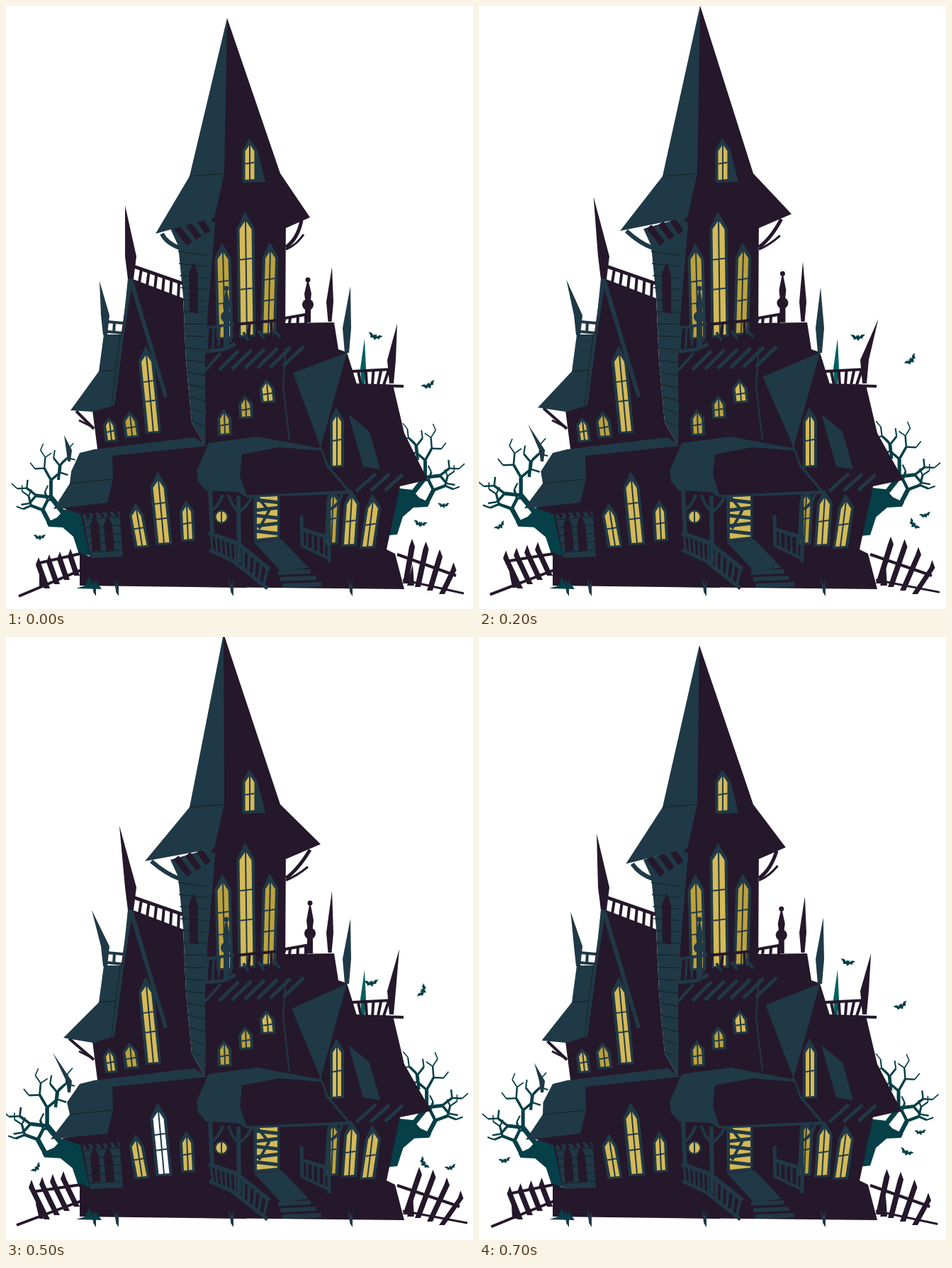
An HTML page with a canvas for the animation above (0.8 s loop, 659 by 850 pixels).

```html
<!DOCTYPE html>
<html lang="en">
<head>
<meta charset="utf-8">
<title>Haunted house</title>
<style>
html, body { margin: 0; height: 100%; overflow: hidden; background: #fff; }
canvas { display: block; }
</style>
</head>
<body>
<canvas id="stage" width="659" height="850"></canvas>
<script>
const g = document.getElementById('stage').getContext('2d');
const DARK = '#25182b', TEAL = '#203946', TREE = '#063f47', SEAM = '#17282b';
const GOLD = '#d4b957', OCHRE = '#bda13c';

// How far the house is stretched in each 100 ms step.
const STRETCH = [0, .5, .8, 1, .5, 1, .8, .25];
let s, whip, lift, wave;
function setPose(t) {
  s = STRETCH[Math.floor(t / 100) % STRETCH.length];
  whip = Math.sin(Math.PI * s ** 3);
  lift = Math.sin(Math.PI * s ** 1.3);
  wave = Math.sin(5 * s * s);
}
const tip = (x, y, dx, dy, bend = 0) => [x + dx * s + bend * whip, y + dy * s];

let seed;
function random() {
  seed = (seed * 16807) % 2147483647;
  return seed / 2147483647;
}

function trace(pts) {
  g.beginPath();
  for (let i = 0; i < pts.length; i += 2) g.lineTo(pts[i], pts[i + 1]);
}
function poly(col, ...pts) {
  trace(pts);
  g.fillStyle = col;
  g.fill();
}
function line(col, w, ...pts) {
  trace(pts);
  g.strokeStyle = col;
  g.lineWidth = w;
  g.stroke();
}
function curve(col, w, x, y, cx, cy, x2, y2) {
  g.beginPath();
  g.moveTo(x, y);
  g.quadraticCurveTo(cx, cy, x2, y2);
  g.strokeStyle = col;
  g.lineWidth = w;
  g.stroke();
}
function dot(col, x, y, r) {
  g.beginPath();
  g.arc(x, y, r, 0, 7);
  g.fillStyle = col;
  g.fill();
}
// n bars spread evenly between two end positions.
function bars(n, col, w, a, b) {
  for (let i = 0; i < n; i++)
    line(col, w, ...a.map((v, j) => v + (b[j] - v) * i / (n - 1)));
}
// Pointed window with its peak at x, y; lean shifts the sill sideways.
function win(x, y, w, h, lean, cross = 1, glass = GOLD) {
  const r = w / 2, sy = y + w * .75, by = y + h, rise = Math.min(12, h / 6);
  poly(TEAL, x - 1, y - rise, x + r + 4, sy - 2, x + r + lean + 4, by + 3,
    x - r + lean - 4, by + 4, x - r - 4, sy - 1);
  poly(glass, x, y, x + r, sy, x + r + lean, by, x - r + lean, by + 1, x - r, sy);
  line(TEAL, 2, x, y, x + lean, by + 1);
  for (let i = 1; i <= cross; i++) {
    const k = i / (cross + 1) * .85, cx = x + lean * k, cy = sy + (by - sy) * k;
    line(TEAL, 2, cx - r, cy + 1, cx + r, cy - 1);
  }
}
// Spear finial: moving tip, fixed foot.
function spear(col, point, x, y, h, w = 8) {
  poly(col, ...point, x + w, y - h, x + w / 2, y, x - w / 2, y, x - w, y - h);
}
function finial(col, [x, y], ball, foot) {
  dot(col, x, y + 4, 3.5);
  poly(col, x, y + 2, x + 5, y + (ball - y) * .6, x + 3, ball, x - 3, ball, x - 5, y + (ball - y) * .6);
  dot(col, x, ball, 8);
  line(col, 8, x, ball, x, foot);
}

// Crooked bough: a tapering main stem with side shoots.
function bough(x, y, angle, len, w, depth) {
  if (!depth) return;
  const side = depth % 2 ? 1 : -1, a = angle + side * (.25 + random() * .2);
  const x2 = x + Math.cos(a) * len, y2 = y + Math.sin(a) * len;
  line(TREE, w, x, y, x2, y2);
  const thin = Math.max(1.5, w * .7);
  bough(x2, y2, angle + random() * .3 - .15, len * .8, thin, depth - 1);
  bough(x2, y2, angle + side * (.75 + random() * .3), len * .7, thin, depth - 2 > 0 ? depth - 2 : 0);
}
function tree(kx, ky) {
  seed = 41;
  g.translate(105, 740);
  g.scale(kx, ky);
  g.translate(-105, -740);
  poly(TREE, 125, 705, 82, 710, 72, 721, 57, 728, 60, 734, 80, 735, 95, 748, 103, 773, 125, 775);
  bough(62, 730, -2.3, 22, 6, 5);
  bough(82, 716, -1.8, 30, 7, 6);
  bough(74, 668, -1.05, 20, 4, 4);
}
function bat(x, y, turn, size) {
  g.save();
  g.translate(x, y);
  g.rotate(turn);
  g.scale(size, size);
  poly(TREE, -10, -4, -5, -4, -2, -1, -1, -4, 0, -2, 2, -4, 3, -1, 6, -4, 11, -4, 8, -1, 7, 2, 4, 1, 1, 5, -1, 2, -5, 3, -6, 0);
  g.restore();
}
function picket(x, y, bx, by, w) {
  poly(DARK, x, y, x + w, y + 11, bx + w, by, bx - w, by, x - w, y + 11);
}

function backdrop() {
  g.save();
  tree(1 + .13 * s, 1 + .07 * s);
  g.restore();
  g.save();
  g.transform(-1, 0, 0, 1, 655, -28);
  tree(1 + .05 * s, 1 + .03 * s);
  g.restore();
  spear(TEAL, tip(82, 605, -16, -19), 89, 642, 16, 4);

  bat(520 - 5 * s + 18 * whip, 466 - 23 * wave, .3 - .4 * s, 1);
  bat(596 - 8 * s + 20 * whip, 535 - 45 * s - 10 * wave, -.4 - .7 * s ** 3, 1);
  bat(617 + 10 * s + 6 * lift, 704 + 25 * s ** 3 - 20 * wave, -.3 * s, .8);
  bat(584 + 5 * s + 35 * lift, 730 - 12 * wave, .2 + .8 * s, .95);
  bat(47 - 4 * s - 20 * lift, 749 - 22 * lift, -.8 * s, .85);

  for (let i = 0; i < 4; i++) {
    picket(46 + 15 * i - 10 * s, 777 - 4 * i - 12 * s, 58 + 14 * i, 821 - 6 * i, 4);
    picket(573 + 19.5 * i + 10 * s, 751 + 3.7 * i * i - 4 * s, 564 + 17 * i, 814 + 5 * i, 4);
  }
  picket(50 - 5 * s, 788, 50, 820, 3);
  poly(DARK, 566, 817, 574, 787, 576, 817);
  line(DARK, 4, ...tip(43, 786, -5, -4), 105, 772);
  line(DARK, 4, ...tip(18, 832, -3, -3), 106, 795);
  line(DARK, 4, 552, 773, ...tip(635, 803, 5, 0));
  line(DARK, 3, 560, 809, ...tip(646, 828, 5, -2));
}

function rightWing() {
  spear('#00605f', [506, 469], 504, 533, 22, 4);
  line(DARK, 4, 488, 515, 546, 512);
  line(DARK, 4, 490, 534, 561, 536);
  bars(5, DARK, 4, [497, 515, 501, 534], [540, 513, 533, 534]);
  spear(DARK, tip(552, 448, 3, -8, 9), 544, 532, 33, 6);
  spear(DARK, tip(460, 368, 0, -10, -3), 457, 445, 28, 5);

  poly(DARK, 280, 470, 394, 447, 463, 446, 469, 484, 481, 488, 495, 533, 546, 534, 562, 602,
    ...tip(595, 668, 5, 0), 556, 677, 537, 766, 549, 772, 562, 822, 280, 819);
  spear(TEAL, tip(486, 395, 0, 2, -4), 481, 489, 35, 6);
  poly(TEAL, ...tip(405, 517, -2, 7, -3), 481, 489, 444, 622);
  poly(TEAL, 483, 575, 513, 600, 528, 653, 504, 649);
  bars(3, TEAL, 5, [494, 684, 522, 659], [535, 683, 560, 660]);
  line(TEAL, 3, 443, 621, 453, 647, 486, 686);
  win(467, 577, 12, 70, 0);
  win(462, 690, 11, 66, -3, 1, OCHRE);
  win(488, 692, 14, 66, -4);
  win(518, 698, 14, 63, -8);
}

function tower() {
  poly(DARK, 285, 290, 395, 290, 394, 470, 281, 490);
  curve(DARK, 5, 395, 340, 412, 328, ...tip(417, 302, 12, -2));
  curve(DARK, 3, 395, 343, 410, 337, ...tip(420, 322, 6, 2));

  const eave = tip(211, 321, -15, -5);
  curve(TEAL, 6, eave[0] + 9, eave[1], 226, 334, 245, 341);
  poly(TEAL, 232, 314, 296, 296, 284, 440, 281, 620, 262, 587, 254, 500, 250, 410, 243, 338);
  bars(3, DARK, 9, [240, 311, 259, 335], [273, 301, 285, 319]);
  for (let i = 0; i < 15; i++) {
    const y = 346 + i * 17, drop = Math.abs(i - 5.5);
    line(SEAM, 1.3, 243 + i * 1.15, y, 283 - i * .2, y + drop);
  }
  poly(DARK, 265, 361, 271, 378, 271, 434, 259, 431, 258, 377);

  const top = tip(312, 17, -5, -22, 4);
  poly(DARK, ...top, 387, 236, ...tip(429, 298, 15, -6), 395, 313, 290, 304, 300, 240);
  poly(TEAL, ...top, 308, 236, 294, 298, ...eave, 259, 240);
  line(SEAM, 1.3, 259, 240, 308, 236);
  poly(TEAL, 345, 189, 355, 204, 366, 248, 335, 249, 336, 205);
  win(344, 195, 13, 49, 0);
  win(306, 346, 15, 120, 3, 2, OCHRE);
  win(338, 302, 17, 161, 2, 2);
  win(373, 345, 14, 115, -3, 2, OCHRE);

  // Balcony
  poly(DARK, 281, 487, 318, 469, 395, 463, 395, 560, 281, 560);
  line(DARK, 4, 322, 449, 395, 442);
  bars(5, DARK, 4, [328, 450, 326, 470], [390, 443, 391, 464]);
  bars(3, TEAL, 4, [335, 460, 342, 471], [377, 456, 387, 467]);
  line(DARK, 4, 394, 440, 428, 434);
  bars(3, DARK, 4, [401, 439, 400, 448], [423, 435, 423, 447]);
  finial(DARK, tip(426, 382, 3, -11), 421 - 3 * s, 446);
  line(TEAL, 4, 281, 454, 322, 448);
  bars(5, TEAL, 3, [285, 454, 283, 486], [318, 449, 317, 474]);
  line(TEAL, 5, 281, 487, 308, 484, 324, 476);
  finial(TEAL, [311, 394], 438, 484);
  bars(6, TEAL, 5, [301, 513, 328, 486], [391, 508, 420, 480]);
  line(TEAL, 4, 281, 514, 303, 489);
  line(TEAL, 2, 395, 482, 391, 535, 400, 612);
  win(308, 573, 12, 29, 1, 1, OCHRE);
  win(338, 553, 12, 25, 1, 1, OCHRE);
  win(368, 530, 13, 26, 2);
}

function leftWing() {
  line(DARK, 5, 180, 367, 249, 391);
  bars(6, DARK, 4, [191, 371, 188, 390], [244, 391, 243, 412]);
  spear(DARK, tip(168, 281, -8, -15), 176, 385, 32, 8);
  spear(TEAL, tip(132, 388, -11, -3), 140, 464, 28, 6);
  bars(2, TEAL, 4, [143, 445, 165, 447], [143, 459, 165, 461]);
  line(TEAL, 4, 153, 445, 152, 461);
  poly(DARK, 174, 383, 250, 412, 254, 500, 262, 587, 281, 620, 130, 632, 122, 570, 150, 550);
  const eave = tip(91, 570, -10, -5);
  line(DARK, 4, eave[0] + 8, eave[1] + 1, 124, 596);
  line(DARK, 3, 103, 584, 123, 594);
  poly(TEAL, 138, 463, 164, 463, 172, 384, 179, 385, 167, 460, 153, 563, 123, 572, ...eave, 131, 515);
  line(SEAM, 1.3, 132, 515, 155, 513);
  line(SEAM, 1.3, 161, 463, 149, 563);
  poly(TEAL, 173, 386, 180, 388, 228, 550, 223, 552);
  win(198, 491, 14, 108, 10, 2);
  win(146, 584, 10, 27, 3);
  win(175, 576, 13, 29, 3, 1, OCHRE);
}

function groundFloor() {
  poly(DARK, 103, 706, 150, 632, 285, 616, 330, 660, 340, 820, 104, 817, 104, 770, 118, 776);
  poly(DARK, 78, 707, 142, 695, 163, 711, 104, 716);
  poly(TEAL, 104, 630, 124, 625, 266, 608, 284, 620, 150, 634, 151, 667, 143, 700,
    ...tip(67, 709, -4, -1), 90, 673, 92 - 6 * s, 656);
  line(SEAM, 1.3, 90, 673, 150, 667);
  poly(TEAL, 108, 716, 160, 712, 165, 776, 119, 778);
  bars(5, SEAM, 1.3, [110, 724, 161, 720], [118, 770, 164, 767]);
  bars(5, DARK, 4, [110, 711, 117, 721], [150, 708, 158, 719]);
  for (const x of [126, 145])
    poly(DARK, x - 2, 717, x + 5, 731, x + 8, 767, x - 4, 769, x - 7, 732);
  win(184, 709, 13, 51, 8);
  win(215, 668, 15, 88, 8, 2, s === 1 ? '#fff' : GOLD);
  win(255, 704, 12, 47, 2);
}

function porch() {
  // Door and steps
  poly(TEAL, 349, 689, 386, 689, 386, 752, 350, 755);
  poly(GOLD, 354, 692, 383, 691, 383, 748, 354, 751);
  for (let i = 0; i < 5; i++) {
    const y = 698 + i * 11, slant = i % 2 ? -4 : 4;
    line(TEAL, 5, 351, y - slant / 2, 386, y + slant / 2);
  }
  line(TEAL, 4, 355, 692, 371, 712, 357, 737);
  poly(TEAL, 350, 756, 389, 752, 427, 792, 388, 797);
  bars(3, TEAL, 6, [384, 799, 430, 797], [390, 817, 445, 815]);

  // Right railing
  line(TEAL, 5, 417, 718, 418, 762);
  line(TEAL, 5, 456, 690, 456, 784);
  line(TEAL, 5, 416, 737, 459, 750);
  line(TEAL, 4, 416, 760, 458, 780);
  bars(4, TEAL, 3, [425, 741, 425, 764], [449, 748, 449, 776]);
  curve(TEAL, 4, 456, 710, 470, 704, 474, 688);

  // Left posts and railing
  line(TEAL, 6, 288, 680, 291, 746);
  line(TEAL, 6, 328, 690, 329, 785);
  for (const [x, reach] of [[289, 17], [328, -14], [329, 19]])
    curve(TEAL, 4, x, 713, x + reach * .7, 704, x + reach, 689);
  dot(TEAL, 304, 720, 10);
  dot(GOLD, 304, 720, 7.5);
  line(TEAL, 2, 304, 711, 304, 729);
  line(TEAL, 6, 286, 743, 326, 757, 372, 794);
  line(TEAL, 5, 287, 767, 320, 782, 369, 821);
  bars(6, TEAL, 3, [289, 744, 292, 770], [323, 757, 324, 786]);
  bars(5, TEAL, 4, [335, 763, 335, 795], [369, 792, 363, 819]);

  // Roof
  poly(TEAL, 269, 655, 286, 616, 355, 607, 446, 624, 455, 648, 487, 686, 338, 692, 327, 685, 282, 683, 271, 670);
  poly(DARK, 333, 632, 386, 622, 445, 627, 452, 649, 481, 683, 340, 690, 330, 662);
  line(TEAL, 3, 338, 691, 487, 686);
}

function grass() {
  for (const x of [125, 157, 319, 487]) {
    poly(TEAL, x - 5, 807, x + 1, 818, x + 1, 827, x - 2, 824);
    poly(TEAL, x + 2, 807, x + 2, 832, x - 2, 826);
  }
  poly(TREE, 99, 821, 112, 817, 117, 804, 120, 815, 128, 812, 135, 822);
}

function frame(t) {
  setPose(t);
  g.clearRect(0, 0, 659, 850);
  backdrop();
  rightWing();
  tower();
  leftWing();
  groundFloor();
  porch();
  grass();
  requestAnimationFrame(frame);
}
requestAnimationFrame(frame);
</script>
</body>
</html>
```
